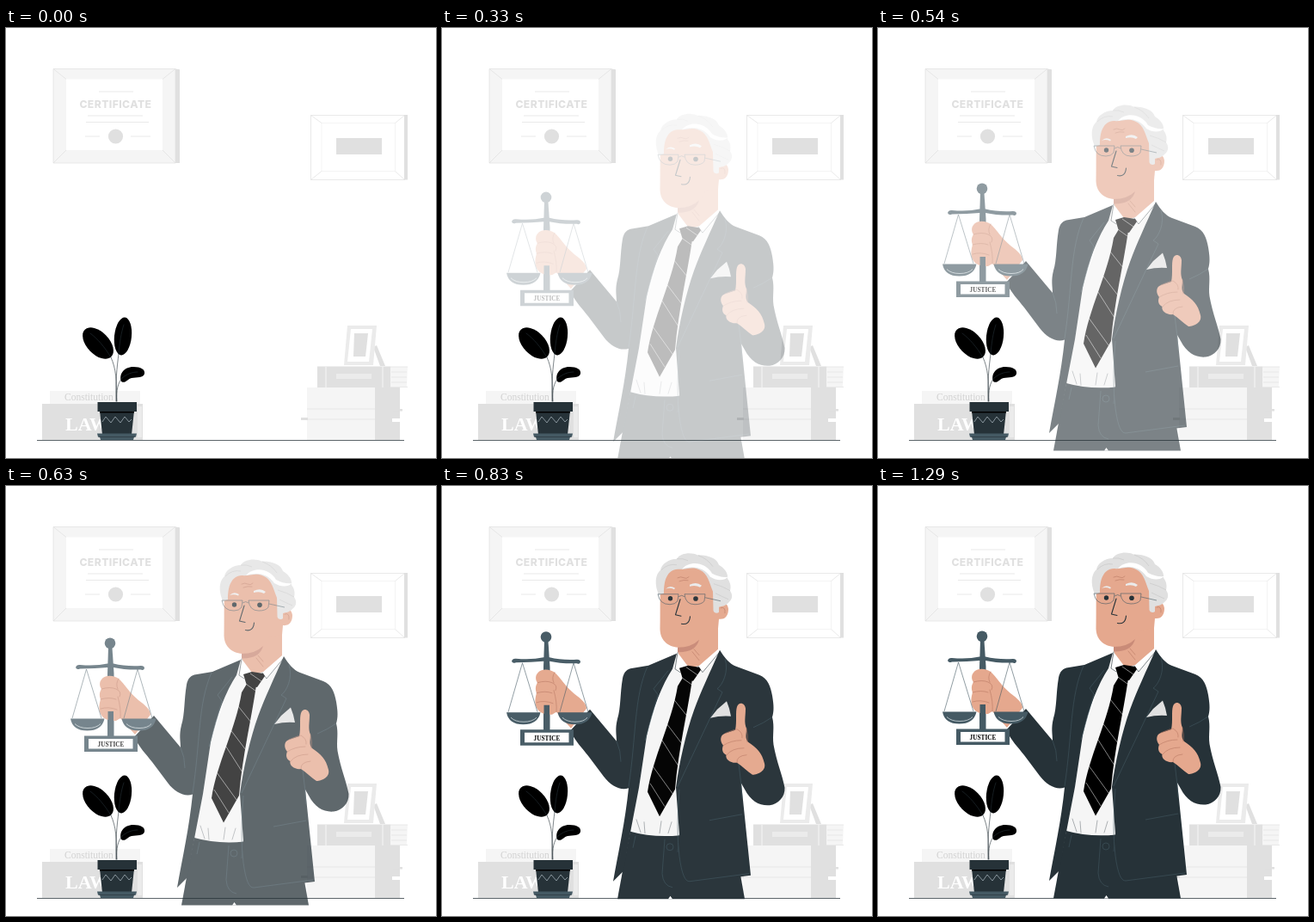
An HTML page that plays this animation: 500 by 500 pixels, repeating every 1330 ms.

```html
<!DOCTYPE html>
<html lang="en">
<head>
<meta charset="utf-8">
<title>Lawyer</title>
<style>
html, body { margin: 0; width: 100%; height: 100%; overflow: hidden; background: #fff; }
svg { display: block; width: 100vw; height: 100vh; }
.g0 { fill: #fff; } .g1 { fill: #f5f5f5; } .g2 { fill: #e0e0e0; } .g3 { fill: #ebebeb; }
.ln { fill: none; stroke: #e0e0e0; stroke-width: .7; }
.suit { fill: #263238; } .metal { fill: #455a64; } .skin { fill: #e5a88e; }
.seam { fill: none; stroke: #455a64; stroke-width: .55; }
.fold { fill: none; stroke: #b97964; stroke-width: .6; stroke-linecap: round; }
.ink { fill: none; stroke: #263238; stroke-width: .6; stroke-linecap: round; stroke-linejoin: round; }
.bold { stroke-width: 1.1; }
.wire { fill: none; stroke: #455a64; stroke-width: .6; }
.serif { font-family: "Liberation Serif", serif; }
</style>
</head>
<body>
<svg viewBox="0 0 500 500">
  <g id="wall">
    <path class="g2" d="M197 47.5l5 .7V157h-5z"/>
    <path class="g1" d="M55 47.5h142V157H55z"/>
    <path class="ln" d="M55 47.5h142V157H55zM55 47.5l15 12M197 47.5l-15 12M55 157l15-15M197 157l-15-15"/>
    <path class="g0" d="M70 59.5h112V142H70z"/>
    <path class="ln" d="M108 74h40M95 102h64M93 109.500h73M92 126h17M145 126h23"/>
    <text x="127.400" y="93" text-anchor="middle" fill="#e0e0e0" font-family="Inter, sans-serif" font-weight="800" font-size="12.200" letter-spacing=".4">CERTIFICATE</text>
    <circle class="g2" cx="127.500" cy="126" r="8.600"/>

    <path class="g2" d="M463 101h4v75.500h-4z"/>
    <path class="ln" d="M354.500 101.500h109v75h-109zM354.500 101.500l12.500 9M463.500 101.500l-11 9M354.500 176.500l12.500-10M463.500 176.500l-11-10"/>
    <path class="ln" stroke-opacity=".5" d="M367 110.500h85.500v56H367z"/>
    <path class="g2" d="M384 128h53v19h-53z"/>
  </g>

  <g id="books">
    <path class="g1" d="M51 422h105v15H51z"/>
    <path class="g2" d="M42 437h117v42H42z"/>
    <path class="g3" d="M153 440h5v36h-5z"/>
    <text class="serif" x="68" y="433" font-size="11.500" fill="#d2d2d2">Constitution</text>
    <text class="serif" x="69" y="468" font-size="22" font-weight="700" fill="#fff">LAW</text>

    <path class="g2" d="M427 371l4-2 10 24h-6z"/>
    <path class="g3" d="M397 346h34l-4 46h-34z"/>
    <path class="g0" d="M401 350h25l-4 38h-25z"/>
    <path class="g2" d="M405 355h16l-3 27h-14z"/>
    <path class="g1" d="M447 394h20l-1 23h-19z"/>
    <path class="ln" d="M447 394h20M448 400h18M448 406h18M448 412h18M447 417.500h20"/>
    <path class="g2" d="M362 393.500h85V418h-85z"/>
    <path class="g3" d="M384 402h41v6h-41zM371 394h2v24h-2zM437 394h2v24h-2z"/>
    <path class="g1" d="M350 418h80v61h-80z"/>
    <path class="g2" d="M429 418h29v61h-29z"/>
    <path class="g0" d="M449 454h9v4h-9z"/>
    <path class="g2" d="M343 453h8v3h-8zM450 443h11v2.500h-11z"/>
    <path class="ln" d="M350 443h79M350 455h79"/>
  </g>

  <path fill="#263238" d="M36 479h427v.8H36z"/>

  <g id="plant">
    <ellipse cx="107" cy="366.500" rx="22" ry="13" transform="rotate(46 107 366.500)"/>
    <ellipse cx="136" cy="358.500" rx="10" ry="22" transform="rotate(6 136 358.500)"/>
    <path d="M134 411C131 403 137 394 148 394C157 394 162 397 161 402C160 407 152 406 146 407C141 408 139 414 134 411z"/>
    <path class="ink" d="M128 434C129 410 128 396 122 383M128.500 434C127 412 129 395 131 379M129 434C128 421 130 413 135 407"/>
    <path class="ink" d="M122 383C114 370 107 362 98 355M131 379C132 366 134 354 137 345M135 407C141 402 147 400 153 400"/>
    <path class="suit" d="M109 445h40l-3 28h-34z"/>
    <path class="suit" d="M106.500 435h45.500v11h-45.500z"/>
    <path d="M109 446h40v1.500h-40z"/>
    <path fill="none" stroke="#b0bec5" stroke-width=".7" d="M112 458l4-6 6 7 5-7 6 7 5-7 5 6 3-3"/>
    <path class="metal" d="M106 471.500h46l-1 4h-2l-1 3.500h-38l-1-3.500h-2z"/>
    <path class="ink" d="M108 475.500h42"/>
  </g>

  <g id="man" opacity="0">
    <path class="suit" d="M219 400L276 404L345 440L352 479.500H204L210 447z"/>
    <path class="g0" d="M263 479.500l2.500-3.500 2.500 3.500z"/>
    <path class="seam" d="M259 410L256 450Q257 464 268 466M276 407L274 425M225 406L222 420"/>
    <circle class="seam" cx="265" cy="419" r="4"/>

    <path class="g1" d="M274 193L262 216L238 290L219 401Q245 408.500 277 405.500L272 350L302 250L324 191z"/>
    <path class="ink" stroke-opacity=".6" d="M231 402l-5-15M236 403l-1-13M253 403l2-14M263 403l4-13"/>

    <path class="skin" d="M274 180L275 201L286 211L300 208L321 190L321 140z"/>
    <path class="skin" d="M255 100C253 120 254 145 253.500 166C254 180 264 187 277 187C294 186 303 176 306 168L321 165L322 154C330 155 333 149 333 142C332 134 325 133 320 138L316 95L290 86z"/>
    <path fill="#c98b78" d="M274 187Q290 187 299 178Q295 193 274 192.500z"/>
    <path class="fold" d="M293 189l6 7M291 192l8 10M324 141Q330 139 329 147"/>
    <path class="g2" d="M250 120C247 109 249.500 101 254 97C255 90 264 84 273 84C277 77 290 76 297 79.500C308 79 320 83 322 91C329 95 333 101 332 107C336 112 336 117 335 121C339 127 337 132 333 135C330 139 325 139 322 140L322 146C320 148 316 147 315.500 144L315 122C311 112 309 101 300 97C291 92 284 97 274 96C262 97 258 108 258 124L252 126z"/>
    <path class="g0" d="M279 96C288 85 307 88 314 101Q323 106 333 105Q324 112 312 105C304 93 290 92 279 96z"/>
    <path fill="none" stroke="#c4c4c4" stroke-width=".6" d="M255 97Q263 89 273 91M273 84Q280 83 286 86M298 80Q309 84 315 93M316 113Q327 116 335 121M318 124Q326 128 333 131"/>
    <path class="g3" d="M260 119Q265 114 271 118L270 119.500Q265 117 260 119zM288 114Q296 110 302 115L300 117Q295 114 288 116z"/>
    <path class="fold" d="M274 106q4-2 7 0t6-1M276 110q5-2 10-1"/>
    <path class="wire" d="M251 125h24l-1 8q-3 4-9 4-12 0-14-12zM282 125h24l-1 8q-3 4-11 4-11 0-12-12zM275 128q4-3 7 0M306 129l18 4"/>
    <circle class="suit" cx="265.500" cy="130" r="2.700"/>
    <circle class="suit" cx="295" cy="130.300" r="2.800"/>
    <path class="ink bold" d="M277 131L271.500 149L278 150.500M278.500 159.500Q287.500 161.500 288.500 151"/>

    <path class="g0" d="M274 193L271 212L277 218L286 209zM321 189L324 193L303 218L298 209z"/>
    <path class="ink" d="M274 193L271 212L277 216M298 209L303 216L323 192"/>
    <path d="M276 211L286 208L299 210L301 213L292 226L280 224z"/>
    <path d="M280 222L291 224C285 265 275 305 271 352L253 383.500L239 355C245 315 267 275 274 232z"/>
    <path fill="none" stroke="#eee" stroke-width=".55" d="M284 210l13 9M276 220l14 10M270 248l16 20M260 274l19 25M254 292l21 33M245 325l26 36M242 345l17 27"/>

    <path class="suit" d="M273 194L240 208L219 211.500C214 213 211 217 210 223C207 240 208 258 204 270C201 282 203 288 203 296L172 259L149 284C155 296 163 304 170 313L188 337C197 349 208 353.500 217 350.500C213 390 205 425 199 459L211 447L219 402L229 350L238 290C245 258 256 230 268 212z"/>
    <path class="suit" d="M323 190C328 198 334 206 342 209L369 219C379 223 382 232 384 243C386 255 386 261 384 268C387 280 384 288 385.500 300C389 320 396 336 398.500 350C399 361 391 369 381 370.500C370 371.500 359 366 352 352L348 345L359 452L287 461C276 445 272 420 276 404L272 350C276 320 284 285 293 260C301 238 312 215 323 190z"/>
    <path class="seam" d="M239 209C223 245 226 290 217 349M263 214L246 235L251 242L236 295M203 296Q208 307 208 320M329 200C334 215 326 231 320 235L326 239L274 349M276 352Q272 400 276 430T288 459L357 450M311 388L349 381M345 322Q348 345 349 362M384 268Q374 275 362 280"/>
    <path class="g2" d="M312 269L320 259L331 249.500L334 258L336 267Q324 266 312 269z"/>

    <path class="skin" d="M341 283C343 273 341 262 343 256C345 250 352 251 353 258C353 268 351 274 354 281C354 288 352 293 356 297C366 304 372 309 375 322C377 330 368 335 361 335C355 331 349 325 343 321C336 322 329 317 330.500 312C326 310 325 305 327 301C323 296 323 289 329 287z"/>
    <path class="fold" d="M329 287Q338 283 343 282Q350 286 349 292M327 301Q336 295 348 295M331 312Q337 304 351 304M343 321Q342 313 354 312M354 281Q356 290 355 297"/>

    <path class="metal" d="M119 180h4.500l2 30v73h-7.500v-73z"/>
    <circle class="metal" cx="121" cy="174.700" r="6.300"/>
    <path class="metal" d="M81 203Q82 199.500 86 200Q105 201.500 118 198.500H125Q139 202 157 201Q161 201 161 204Q160 207 157 205.500Q138 206 125 203H118Q104 204 86 204.500Q82 206 81 203z"/>
    <path class="skin" d="M111 217C115 211 126 212 131 216C138 222 143 232 154 241C162 247 168 252 168 258L150 281L133 262L128 265C121 265 113 264 110 257C107 250 109 244 110 240C108 235 109 231 111 228C108 224 109 219 111 217z"/>
    <path class="fold" d="M111 228q10-3 17 0t4 9M110 240q10-3 18 0M110 251q9-3 19 1M131 216q-4 6-1 12M130 237q4 14 3 25"/>
    <path class="metal" d="M118.500 254h6.500v30h-6.500z"/>
    <path class="wire" d="M77 262L93.500 205L111 262M137 262L153 205L170 262"/>
    <path class="metal" d="M75 262.500h39.500q-3 14-20 14t-19.500-14zM134.500 262.500h40q-3 14-20 14t-20-14z"/>
    <path fill="none" stroke="#cfd8dc" stroke-width=".8" d="M80 268.500q5 5 15 5t15-5M140 268.500q5 5 15 5t14-5"/>
    <path class="metal" d="M91 282.500h62V301H91z"/>
    <path class="g0" d="M96 286h51.500v11.500H96z"/>
    <text class="serif" x="122" y="295" text-anchor="middle" font-size="7.300" font-weight="700">JUSTICE</text>
  </g>
</svg>
<script>
const LOOP = 1330, STEP = LOOP / 32, RISE = 30;
const man = document.getElementById('man');

const bez = (a, b, s) => 3 * a * s * (1 - s) ** 2 + 3 * b * s * s * (1 - s) + s ** 3;

// cubic-bezier(.36, -.01, .5, 1.38), solved by bisection
function ease(x) {
  if (x >= 1) return 1;
  let lo = 0, hi = 1;
  for (let i = 0; i < 24; i++) {
    const mid = (lo + hi) / 2;
    if (bez(.36, .5, mid) < x) lo = mid; else hi = mid;
  }
  return bez(-.01, 1.38, lo);
}

function draw(time) {
  const step = Math.floor((time % LOOP + 5) / STEP);
  const p = ease((step + .3) / 31);
  man.setAttribute('opacity', step < 4 ? 0 : Math.min(1, p));
  man.setAttribute('transform', `translate(0 ${RISE * (1 - p)})`);
}

function tick() {
  draw(performance.now());
  requestAnimationFrame(tick);
}
tick();
</script>
</body>
</html>
```
